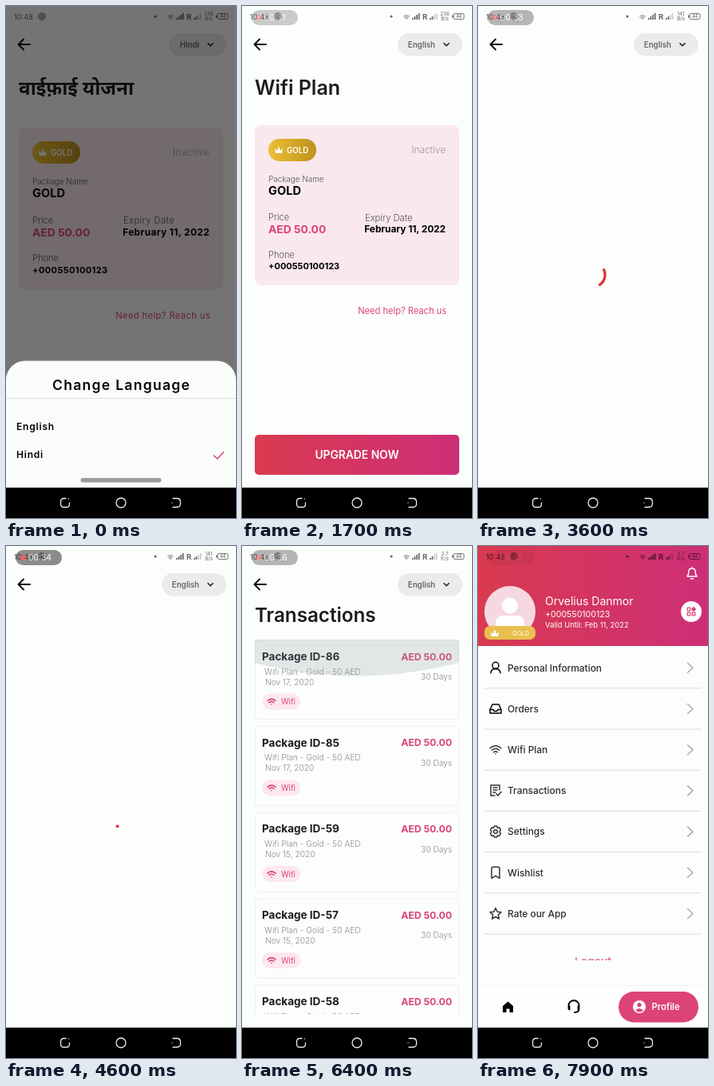
Write an HTML page that moves like this. It is 288 px wide and 640 px high and loops after 8000 ms.

```html
<!DOCTYPE html>
<html lang="en">
<head>
<meta charset="utf-8">
<style>
  html, body { margin: 0; width: 100%; height: 100%; overflow: hidden; background: #fcfefc; }
  svg { display: block; width: 100vw; height: 100vh; }
  text { font-family: Inter, "Noto Sans Devanagari", "Noto Sans", sans-serif; white-space: pre; }
  .line { fill: none; stroke-linecap: round; stroke-linejoin: round; }
</style>
</head>
<body>
<svg id="stage" viewBox="0 0 288 640">
  <defs>
    <linearGradient id="brand"><stop stop-color="#d93a4f"/><stop offset="1" stop-color="#cd2f78"/></linearGradient>
    <linearGradient id="gold"><stop stop-color="#edbf35"/><stop offset="1" stop-color="#bd911d"/></linearGradient>
    <clipPath id="listArea"><rect y="117" width="288" height="468"/></clipPath>
    <clipPath id="logoutStrip"><rect x="110" y="514" width="70" height="4"/></clipPath>
  </defs>
</svg>
<script>
const LOOP = 8000;
const BG = '#fcfefc', PINK = '#dc4378', INK = '#1c1c1e', GREY = '#999';
const PHONE = '+000550100123', PERSON = 'Orvelius Danmor';

const text = (x, y, str, size, weight = 400, fill = INK, extra = '') =>
  `<text x="${x}" y="${y}" font-size="${size}" font-weight="${weight}" fill="${fill}" ${extra}>${str}</text>`;
const rect = (x, y, w, h, r, fill, extra = '') =>
  `<rect x="${x}" y="${y}" width="${w}" height="${h}" rx="${r}" fill="${fill}" ${extra}/>`;
const circle = (x, y, r, fill, extra = '') =>
  `<circle cx="${x}" cy="${y}" r="${r}" fill="${fill}" ${extra}/>`;
const line = (d, color, width = 1.4, x = 0, y = 0, scale = 1) =>
  `<path class="line" d="${d}" stroke="${color}" stroke-width="${width}" transform="translate(${x} ${y}) scale(${scale})"/>`;
const shape = (d, fill, x = 0, y = 0) => `<path d="${d}" fill="${fill}" transform="translate(${x} ${y})"/>`;
const group = (id, body, extra = '') => `<g id="${id}" ${extra}>${body}</g>`;
const END = 'text-anchor="end"', MIDDLE = 'text-anchor="middle"';

const CROWN = 'M-5 -2L-2 1L0 -5L2 1L5 -2L4 4H-4Z';
const WIFI = 'M-7 -2Q0 -8 7 -2M-4.7 .5Q0 -3.5 4.7 .5M-2.3 3Q0 1 2.3 3M0 5V5.1';

function statusBar() {
  const bars = (x, solid) => [0, 1, 2, 3].map(i =>
    rect(x + i * 2.6, 15 - i * 2, 1.7, 2 + i * 2, 0, '#000', i >= solid ? 'opacity=".35"' : '')).join('');
  return text(10, 16.5, '10:48', 9.3, 400, '#000') +
    circle(45, 13, 5, '#000', 'opacity=".55"') + circle(187, 13, 1.6, '#000') +
    line(WIFI, '#000', 1.6, 206, 14, .5) +
    bars(213, 4) + text(226, 17, 'R', 9.5, 700, '#000') + bars(235, 2) +
    text(254, 11.5, '', 6.3, 400, '#000', MIDDLE + ' id="netRate"') +
    text(254, 18, '', 6.3, 400, '#000', MIDDLE + ' id="netUnit"') +
    rect(265, 9.5, 13, 7, 1.5, 'none', 'stroke="#000" stroke-width=".9"') +
    rect(263, 11.5, 1.5, 3, 0, '#000') + text(271.5, 15.2, '44', 5.5, 500, '#000', MIDDLE);
}

function pageTop(language) {
  const left = language === 'Hindi' ? 204 : 195;
  return rect(0, 0, 288, 640, 0, BG) +
    line('M30 48H16M22 41.5L15.5 48L22 54.5', '#000', 1.9) +
    rect(left, 34, 276 - left, 28.5, 14.2, '#ebebea') +
    text(242, 51.7, language, 9.7, 600, '#666', END) +
    line('M253 46.7L256 49.7L259 46.7', '#222', 1.6);
}

function wifiPlan(hindi) {
  const at = y => hindi ? y + 3 + Math.max(0, (y - 230) / 50) : y;
  const wide = hindi ? 'letter-spacing=".42"' : '';
  const top = at(149);
  return pageTop(hindi ? 'Hindi' : 'English') +
    text(16, 111, hindi ? 'वाईफ़ाई योजना' : 'Wifi Plan', hindi ? 24.2 : 25, 600) +
    rect(16, top, 256, at(349) - top, 8, '#f9e8ec') +
    rect(33, at(166), 60, 28, 14, 'url(#gold)') + shape(CROWN, '#fff', 46, at(180)) +
    text(56, at(183.5), 'GOLD', 9.7, 600, '#fff') +
    text(255, at(184), 'Inactive', 11.8, 300, GREY, END + wide) +
    text(33, at(219.5), 'Package Name', 9.9, 300, '#555') +
    text(33, at(236), 'GOLD', 14.6, 700, '#000') +
    text(33, at(268), 'Price', 11, 300, '#555') +
    text(33, at(284), 'AED 50.00', 13.8, 700, PINK) +
    text(hindi ? 147 : 154, at(268.5), 'Expiry Date', 11.2, 300, '#555', wide) +
    text(255, at(283), 'February 11, 2022', 11.8, 700, '#000', END + wide) +
    text(33, at(314.5), 'Phone', 11, 300, '#555') +
    text(33, at(329), PHONE, 11, 700, '#000', wide) +
    text(256, at(384.5), 'Need help? Reach us', 11.1, 400, PINK, END + wide) +
    rect(16, 536, 256, 50, 5, 'url(#brand)') +
    text(144, 566, 'UPGRADE NOW', 13.8, 600, '#fff', MIDDLE);
}

function transactionCard([id, day], index) {
  const y = 117.5 + index * 107.8;
  return rect(16.5, y, 255, 99, 4, BG, 'stroke="#eef0ee"') +
    text(25, y + 25.3, 'Package ID-' + id, 13.5, 700) +
    text(263, y + 25, 'AED 50.00', 12.2, 700, PINK, END) +
    text(28, y + 43, 'Wifi Plan - Gold - 50 AED', 10.3, 300, '#8c8c8e') +
    text(29, y + 56, `Nov ${day}, 2020`, 10.2, 300, '#8c8c8e') +
    text(263, y + 49.5, '30 Days', 10.2, 300, '#8c8c8e', END) +
    rect(25, y + 67, 48.5, 20, 10, '#fce8ee') +
    line('M-5 -1Q0 -5.4 5 -1M-3 1.2Q0 -1.4 3 1.2M0 3.4V3.5', PINK, 1.6, 37, y + 77) +
    text(49, y + 80.7, 'Wifi', 9.7, 400, PINK);
}

function transactions() {
  const items = [[86, 17], [85, 17], [59, 15], [57, 15], [58, 15], [60, 15], [54, 15]];
  return pageTop('English') +
    group('listTitle', text(16, 95, 'Transactions', 24.2, 600)) +
    group('list', group('cards', items.map(transactionCard).join('')), 'clip-path="url(#listArea)"') +
    group('glow', shape('M16 117H272V146Q144 179 16 146Z', '#87949a'), 'opacity="0"') +
    '<path id="spinner" fill="none" stroke="#e3303c" stroke-width="3.2"/>';
}

function profile() {
  const rows = [
    ['Personal Information', 'M-4 -3A4 4 0 1 0 4 -3A4 4 0 1 0 -4 -3M-6 6.5Q-6 1.5 0 1.5T6 6.5', '#000'],
    ['Orders', 'M-7 1L-4 -5.5H4L7 1V5.5H-7ZM-7 1H-3L-1.5 3H1.5L3 1H7', '#000'],
    ['Wifi Plan', WIFI],
    ['Transactions', 'M5 -1V-7H-6V6H-1M-3 -4H2M-3 -1H2M-3 2H0M1 4L3 6L7 1.5'],
    ['Settings', 'M-1.5 -7H1.5L2.3 -4.8L4.7 -5.2L6.5 -2.5L5 0L6.5 2.5L4.7 5.2L2.3 4.8L1.5 7H-1.5L-2.3 4.8L-4.7 5.2L-6.5 2.5L-5 0L-6.5 -2.5L-4.7 -5.2L-2.3 -4.8ZM-2.3 0A2.3 2.3 0 1 0 2.3 0A2.3 2.3 0 1 0 -2.3 0'],
    ['Wishlist', 'M-5 7V-5Q-5 -7 -3 -7H3Q5 -7 5 -5V7L0 4Z'],
    ['Rate our App', 'M0 -7L2.1 -2.3L7 -1.8L3.3 1.6L4.4 6.5L0 4L-4.4 6.5L-3.3 1.6L-7 -1.8L-2.1 -2.3Z'],
  ];
  const menu = rows.map(([label, icon, color = '#333'], i) => {
    const y = 152.3 + i * 51.2;
    return line(icon, color, 1.5, 22, y) + text(37, y + 4.2, label, 11.9, 500, '#2c2c30') +
      line('M262.5 -6L269 0L262.5 6', '#aaa', 1.5, 0, y) + rect(8, y + 25, 272, 1, 0, '#dcdedc');
  }).join('');
  const grid = [[-3, -3], [-3, 3], [3, 3]].map(([x, y]) =>
    rect(265.2 + x, 80.2 + y, 3.6, 3.6, .6, 'none', `stroke="${PINK}" stroke-width="1.3"`)).join('');
  return rect(0, 0, 288, 640, 0, BG) + rect(0, 0, 288, 125, 0, 'url(#brand)') +
    line('M-6 4H6Q4.2 2 4.2 -1.5Q4.2 -6 0 -6T-4.2 -1.5Q-4.2 2 -6 4ZM-1.5 7H1.5M0 -6V-7.3', '#fff', 1.5, 268, 34) +
    circle(40, 82, 32, '#f6d8e1') + circle(40, 74.5, 10, '#fff') +
    shape('M22 101V97Q22 87 32 87H48Q58 87 58 97V101Z', '#fff') +
    rect(8, 100, 64, 17, 7, '#e9c04f') + shape(CROWN, '#fff', 21, 109) +
    text(43, 111.5, 'GOLD', 7.6, 600, '#fff8dd', 'opacity=".8"') +
    text(84, 74, PERSON, 14, 400, '#fff') + text(84, 89.3, PHONE, 10.6, 400, '#fff') +
    text(84, 102, 'Valid Until: Feb 11, 2022', 9.4, 400, '#fff') +
    circle(267, 82, 13, '#fff') + grid + shape('M270 75.7L273.2 79L270 82.2L266.8 79Z', PINK) +
    menu + group('logout', text(144, 523.5, 'Logout', 13.8, 500, '#e8607f', MIDDLE), 'clip-path="url(#logoutStrip)"') +
    rect(0, 549, 288, 1, 0, '#f3f5f3') + rect(0, 550, 288, 60, 0, '#fdfefd') +
    shape('M0 -7L6.5 -1.5V6.5H2V2H-2V6.5H-6.5V-1.5Z', '#000', 37.5, 576.5) +
    line('M-6.5 3V-1A6.5 6.5 0 0 1 6.5 -1V3Q6.5 7.5 1 7.5M-5.5 0V4M5.5 0V4', '#000', 1.9, 120, 575.5) +
    rect(176, 557, 100, 38.5, 19.2, PINK) + circle(202, 576, 8, '#fff') +
    circle(202, 573.6, 2.6, PINK) + shape('M197 580.5Q202 575.5 207 580.5Q202 584.5 197 580.5Z', PINK) +
    text(217.5, 580, 'Profile', 11.2, 600, '#fff');
}

function languageSheet() {
  return shape('M0 602V467.5A24 24 0 0 1 24 443.5H264A24 24 0 0 1 288 467.5V602Z', '#fafcfa') +
    text(144.6, 480, 'Change Language', 17.5, 600, '#000', MIDDLE + ' letter-spacing="1.3"') +
    rect(0, 490, 288, 1, 0, '#dcdedc') +
    text(13, 530, 'English', 12, 600, '#000', 'letter-spacing=".8"') +
    text(13, 565, 'Hindi', 12, 600, '#000', 'letter-spacing=".8"') +
    group('check', line('M260.5 562L264.5 566L272.5 557.5', PINK, 1.5)) +
    rect(93.5, 590, 101, 5.5, 2.7, '#9a9b9a');
}

function navBar() {
  return rect(0, 602, 288, 38, 0, '#000') +
    line('M1 -5.5H-1.5Q-5.5 -5.5 -5.5 -1.5V1.5Q-5.5 5.5 -1.5 5.5H1.5Q5.5 5.5 5.5 1.5V0M4.5 -5V-4.9', '#eee', 1.3, 74, 621) +
    circle(144, 621, 6, 'none', 'stroke="#eee" stroke-width="1.3"') +
    line('M-4 -5.5H1Q5.5 -5.5 5.5 -1V1Q5.5 5.5 1 5.5H-4M-5 0V.1', '#eee', 1.3, 213, 621);
}

const stage = document.getElementById('stage');
stage.insertAdjacentHTML('beforeend',
  group('profile', profile()) + group('transactions', transactions()) +
  group('planHindi', wifiPlan(true)) + group('planEnglish', wifiPlan(false)) +
  group('status', statusBar(), 'opacity=".6"') +
  group('scrim', rect(0, 0, 288, 640, 0, '#000')) + group('sheet', languageSheet()) + navBar() +
  group('recorder', rect(12, 5, 58, 19, 9.5, '#000', 'opacity=".6"') + circle(21.5, 14.5, 3.4, '#ee3038') +
    text(28, 18.2, '', 10.3, 400, '#fff', 'id="recTime"')));

const el = {};
stage.querySelectorAll('[id]').forEach(node => el[node.id] = node);

const ramp = (t, from, to) => Math.min(1, Math.max(0, (t - from) / (to - from)));
const ease = (t, from, to) => { const p = ramp(t, from, to); return p * p * (3 - 2 * p); };
const show = (node, visible) => node.setAttribute('display', visible ? 'inline' : 'none');
const fade = (node, value) => node.setAttribute('opacity', value);
const moveY = (node, y) => node.setAttribute('transform', `translate(0 ${y})`);

// Pages fade while rising from a quarter of the screen height.
function placePage(node, shown) {
  show(node, shown > 0);
  fade(node, shown);
  moveY(node, (1 - shown) * 150);
}

function drawSpinner(elapsed) {
  const phase = elapsed / 1333 % 1;
  const head = ease(phase, 0, .5) * 270, tail = ease(phase, .5, 1) * 270;
  const start = -90 + tail + elapsed / 2222 * 360 + phase * 90;
  const point = deg => [144 + 15 * Math.cos(deg * Math.PI / 180), 336 + 15 * Math.sin(deg * Math.PI / 180)];
  const sweep = Math.max(head - tail, 14);
  el.spinner.setAttribute('d', `M${point(start)}A15 15 0 ${+(sweep > 180)} 1 ${point(start + sweep)}`);
}

function render(t) {
  const hindi = t < 400;
  show(el.planHindi, hindi);
  placePage(el.planEnglish, hindi ? 0 : 1 - ease(t, 2200, 2500));
  placePage(el.transactions, ease(t, 3150, 3450) - ease(t, 7000, 7300));

  const closing = ease(t, 400, 700);
  fade(el.scrim, .54 * (1 - closing));
  moveY(el.sheet, closing * 160);
  moveY(el.check, hindi ? 0 : -35);

  const loaded = t >= 5000;
  show(el.list, loaded);
  show(el.listTitle, loaded);
  show(el.spinner, !loaded && t >= 3340);
  drawSpinner(Math.max(0, t - 3340));
  moveY(el.cards, -206 * (ease(t, 5200, 5800) - ease(t, 5900, 6300)));
  fade(el.glow, .22 * (ramp(t, 6200, 6400) - ramp(t, 6450, 6800)));

  const [rate, unit] = t < 2300 ? ['236', 'B/s'] : t < 4800 ? ['141', 'B/s'] : ['2.7', 'K/s'];
  el.netRate.textContent = rate;
  el.netUnit.textContent = unit;

  fade(el.recorder, Math.abs(Math.sin(Math.PI * t / 2000)) ** 1.4);
  el.recTime.textContent = '00:' + (30 + Math.floor(t / 1000));
}

const begin = performance.now();
function tick() {
  const t = (performance.now() - begin) % LOOP;
  render(Math.floor(t / 100) * 100);
  requestAnimationFrame(tick);
}
tick();
</script>
</body>
</html>
```
